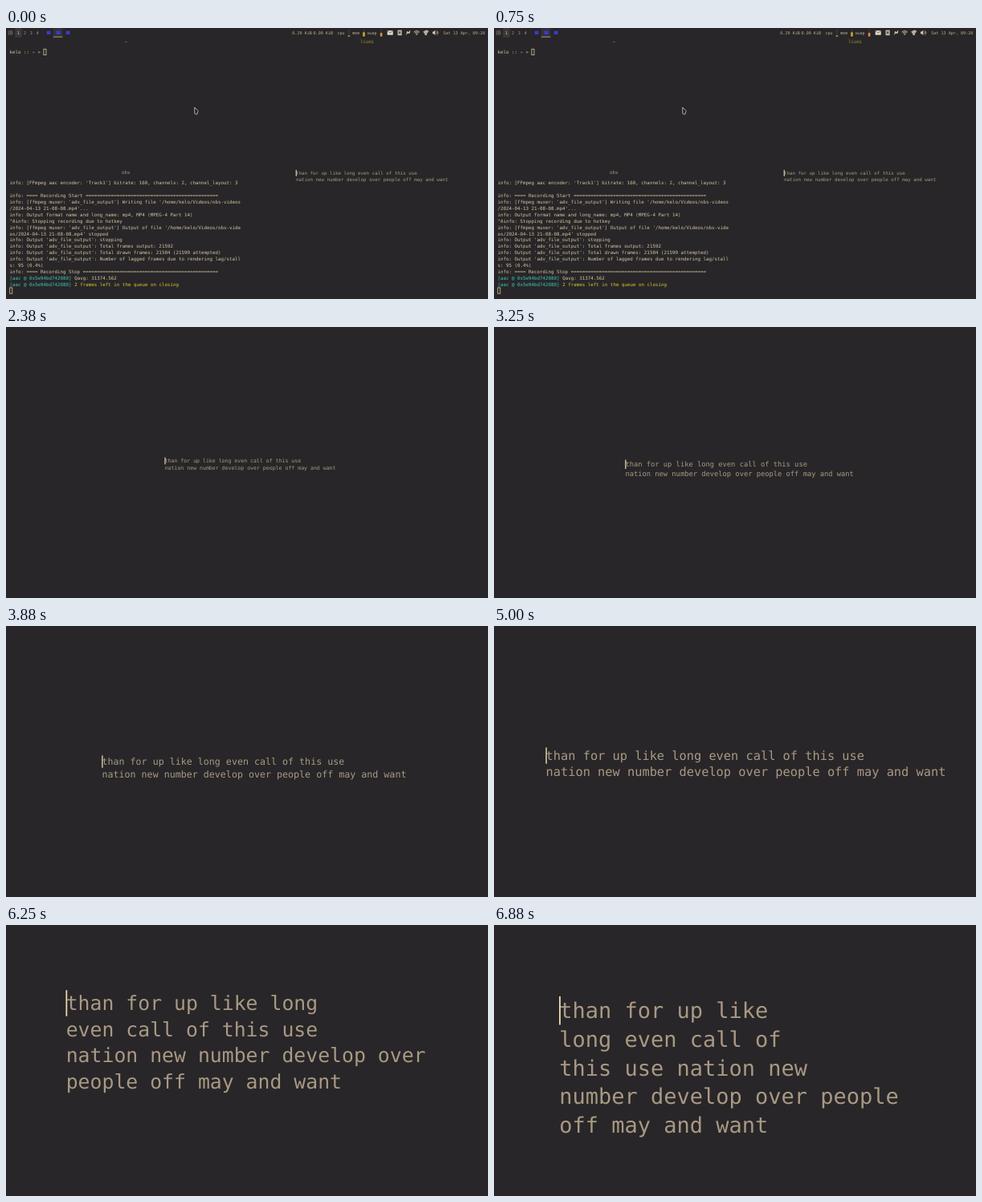
Recreate the animation shown at these times as an HTML page with a canvas. Size 600x338 px, loop 8000 ms.

```html
<!DOCTYPE html>
<html lang="en">
<head>
<meta charset="utf-8">
<title>Typing test zoom</title>
<style>
  html, body { margin: 0; width: 100%; height: 100%; overflow: hidden; background: #282628; }
  canvas { display: block; width: 100vw; height: 100vh; }
</style>
</head>
<body>
<canvas id="stage"></canvas>
<script>
const W = 600, H = 338, LOOP = 8000;
const K = W / 1366;          // desktop pixels to stage units
const ADVANCE = 0.602;       // monospace advance per em
const BASELINE = 0.773;      // baseline position within a cell
const BG = '#282628', FG = '#d5c4a1', DIM = '#a89984', CURSOR = '#ebdbb2';
const CYAN = '#3cc8b4', YELLOW = '#d6cb2c', BLUE = '#3a3ad0';

const canvas = document.getElementById('stage');
const ctx = canvas.getContext('2d');
const dpr = window.devicePixelRatio || 1;
canvas.width = W * dpr;
canvas.height = H * dpr;
ctx.scale(dpr, dpr);
ctx.textRendering = 'geometricPrecision';

const words = ('than for up like long even call of this use ' +
  'nation new number develop over people off may and want').split(' ');

// Words per line
const WIDE = [10, 10], THREE = [7, 7, 6], EVEN = [8, 6, 6];
const FOUR = [5, 5, 5, 5], FIVE = [4, 4, 4, 4, 4];

// start ms, cell width, cell height, column, row, layout
const zooms = [
  [1000, 8, 18, 60, 20, WIDE],
  [2380, 9, 20, 50, 18, WIDE],
  [2750, 10, 22, 43, 16, WIDE],
  [3000, 11, 24, 37, 15, WIDE],
  [3250, 12, 26, 31, 14, WIDE],
  [3500, 13, 29, 27, 12, WIDE],
  [3750, 15, 32, 20, 11, WIDE],
  [3880, 16, 35, 17, 10, WIDE],
  [4250, 19, 42, 10, 8, WIDE],
  [5000, 21, 46, 7, 7, WIDE],
  [5130, 23, 51, 4, 7, WIDE],
  [5380, 28, 61, 5, 4, THREE],
  [5500, 29, 64, 6, 4, EVEN],
  [5630, 30, 66, 6, 5, EVEN],
  [6130, 31, 68, 5, 4, EVEN],
  [6250, 34, 74, 5, 2, FOUR],
  [6880, 37, 81, 5, 2, FIVE]
];

const RULE = '='.repeat(47);
const OUT = "info: Output 'adv_file_output': ";
const MUX = "info: [ffmpeg muxer: 'adv_file_output'] ";
const AAC = '[aac @ 0x5e94bd742080] ';
const log = [
  "info: [FFmpeg aac encoder: 'Track1'] bitrate: 160, channels: 2, channel_layout: 3",
  '',
  'info: ==== Recording Start ' + RULE,
  MUX + "Writing file '/home/kelo/Videos/obs-videos",
  "/2024-04-13 21-08-08.mp4'...",
  'info: Output format name and long_name: mp4, MP4 (MPEG-4 Part 14)',
  '^Ainfo: Stopping recording due to hotkey',
  MUX + "Output of file '/home/kelo/Videos/obs-vide",
  "os/2024-04-13 21-08-08.mp4' stopped",
  OUT + 'stopping',
  OUT + 'Total frames output: 21592',
  OUT + 'Total drawn frames: 21504 (21599 attempted)',
  OUT + 'Number of lagged frames due to rendering lag/stall',
  's: 95 (0.4%)',
  'info: ==== Recording Stop =' + RULE
];

function rect(x, y, w, h, color) {
  ctx.fillStyle = color;
  ctx.fillRect(x, y, w, h);
}

function path(points, fill, stroke, width = 0.8) {
  ctx.beginPath();
  points.forEach(([x, y]) => ctx.lineTo(x, y));
  ctx.closePath();
  if (fill) { ctx.fillStyle = fill; ctx.fill(); }
  if (stroke) { ctx.strokeStyle = stroke; ctx.lineWidth = width; ctx.stroke(); }
}

function arc(x, y, r, from, to, color, width = 0.9) {
  ctx.beginPath();
  ctx.arc(x, y, r, from, to);
  ctx.strokeStyle = color;
  ctx.lineWidth = width;
  ctx.stroke();
}

// (x, y) is the top left of the first cell
function text(s, x, y, color, cell = 8, lh = 18) {
  ctx.font = `${cell * K / ADVANCE}px "DejaVu Sans Mono", monospace`;
  ctx.fillStyle = color;
  ctx.fillText(s, x, y + lh * K * BASELINE);
}

function hollowCursor(x, y) {
  ctx.strokeStyle = FG;
  ctx.lineWidth = 0.8;
  ctx.strokeRect(x + 0.3, y + 0.3, 8 * K - 0.4, 18 * K - 0.6);
}

function passage(x, y, cell, lh, layout) {
  let next = 0;
  layout.forEach((count, i) => {
    text(words.slice(next, next + count).join(' '), x, y + i * lh * K, DIM, cell, lh);
    next += count;
  });
  rect(x - 0.2, y, 0.9 + cell * 0.025, lh * K, CURSOR);
}

function trayIcons() {
  rect(474.7, 3.2, 7, 5.4, '#e8e0cc');
  ctx.beginPath();
  ctx.moveTo(474.7, 3.4);
  ctx.lineTo(478.2, 6.4);
  ctx.lineTo(481.7, 3.4);
  ctx.strokeStyle = BG;
  ctx.lineWidth = 0.7;
  ctx.stroke();

  rect(487.5, 2.6, 5.2, 6.6, '#b8b0a4');
  rect(489, 4.4, 2.2, 2.6, '#55504c');

  path([[498, 9], [499, 4], [501, 5], [503.5, 2.5], [502.5, 7], [500, 6.6]], FG);

  for (const r of [1.8, 3.6, 5.2]) arc(511.2, 8.8, r, -2.35, -0.8, FG);
  rect(510.7, 8, 1, 1, FG);

  path([[519.2, 4.6], [523, 2.6], [526.2, 3.6], [524.8, 6.6], [521, 7.2]], '#b8b0a4');
  rect(521.4, 7, 2.6, 2, '#b8b0a4');

  path([[531, 4.6], [532.4, 4.6], [534.4, 2.8], [534.4, 9], [532.4, 7.2], [531, 7.2]], FG);
  arc(534.8, 5.9, 1.6, -1, 1, FG, 0.7);
  arc(534.8, 5.9, 3.1, -1, 1, FG, 0.7);
}

function meter(x, level, color) {
  rect(x, 1.5, 2.6, 9, '#343234');
  rect(x, 10.5 - level, 2.6, level, color);
}

function topBar() {
  const y = 2.6;
  const label = (s, x, color = '#bdae93') => text(s, x, y, color, 7, 15);

  for (let i = 0; i < 9; i++)
    rect(3.2 + (i % 3) * 1.9, 3.4 + Math.floor(i / 3) * 1.9, 1.1, 1.1, DIM);

  rect(11.3, 0, 8.4, 11.6, '#3a383a');
  ['1', '2', '3', '4'].forEach((s, i) => label(s, 14 + i * 7.9, i ? DIM : FG));

  rect(58.8, 0, 11.6, 11.6, '#343238');
  rect(58.8, 10.6, 11.6, 1, DIM);
  for (let i = 0; i < 3; i++) rect(50.6 + i * 12, 3.6, 4.8, 4.4, BLUE);

  label('0.29 KiB', 356.3);
  label('0.09 KiB', 382.5);
  label('cpu', 412.4);
  meter(425.6, 1, FG);
  label('mem', 431);
  meter(444.2, 5.2, '#c8a830');
  label('swap', 449.3);
  meter(465.8, 4.4, '#d89040');
  trayIcons();
  label('Sat 13 Apr, 09:20', 544.2);
}

function desktop() {
  const x = 4.4, logTop = 189.2, lh = 18 * K, cw = 8 * K;
  topBar();

  text('~', 147.7, 12.6, DIM);
  text('obs', 144, 176, DIM);
  text('lismi', 440.7, 12.6, '#98971a');

  text('kelo :: ~ » ', x, 26, FG);
  hollowCursor(x + 12 * cw, 26);

  log.forEach((s, i) => text(s, x, logTop + i * lh, FG));
  const tail = x + AAC.length * cw;
  text(AAC, x, logTop + 15 * lh, CYAN);
  text('Qavg: 31374.562', tail, logTop + 15 * lh, FG);
  text(AAC, x, logTop + 16 * lh, CYAN);
  text('2 frames left in the queue on closing', tail, logTop + 16 * lh, YELLOW);
  hollowCursor(x, logTop + 17 * lh);

  passage(360.9, 177, 8, 18, WIDE);

  path([[234.8, 99], [239.2, 103.6], [237.6, 107.8], [234.8, 106.6]], '#1c1a1c', '#e0d8c8');
}

function draw(t) {
  rect(0, 0, W, H, BG);
  const zoom = zooms.filter(z => z[0] <= t).pop();
  if (!zoom) return desktop();
  const [, cell, lh, col, row, layout] = zoom;
  passage(col * cell * K, (row + 0.5) * lh * K, cell, lh, layout);
}

const start = performance.now();
function tick() {
  draw((performance.now() - start) % LOOP);
  requestAnimationFrame(tick);
}
tick();
</script>
</body>
</html>
```
